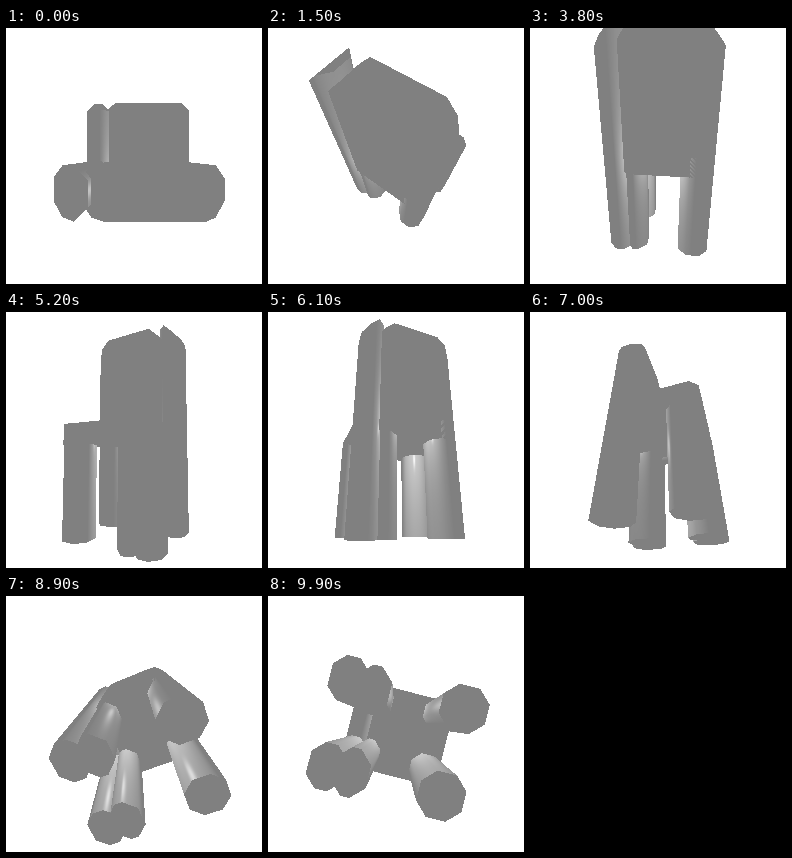
These frames come from a looping animation (256x256 px, 10000 ms). An HTML page with a canvas:

```html
<!DOCTYPE html>
<html>
<head>
<meta charset="utf-8">
<style>
html, body { margin: 0; width: 100%; height: 100%; overflow: hidden; background: #fff; }
canvas { display: block; width: 256px; height: 256px; }
</style>
</head>
<body>
<canvas id="stage" width="256" height="256"></canvas>
<script>
const SIZE = 256, FOCAL = 232, DIST = 415, FRAMES = 100, STEP = 100;
const LIGHT = [0, 54, 12];          // x: right, y: towards the chair back, z: up
const FLOOR = -162, TOP = 205, SHOULDER = 175, SEAT = 23, UNDER = -10;
const ctx = document.getElementById('stage').getContext('2d');
const image = ctx.createImageData(SIZE, SIZE);
const pixels = new Uint32Array(image.data.buffer);
const depth = new Float32Array(SIZE * SIZE);
const triangles = [];

const dot = (a, b) => a[0] * b[0] + a[1] * b[1] + a[2] * b[2];
const sub = (a, b) => [a[0] - b[0], a[1] - b[1], a[2] - b[2]];
const unit = a => { const l = Math.hypot(...a) || 1; return a.map(v => v / l); };
const quad = (a, b, c, d) => triangles.push([a, b, c], [a, c, d]);

// Prism with chamfered corners, smooth sides and separate ends.
// Its top height may vary with x, bending at the given x positions.
function prism(x0, x1, y0, y1, z0, z1, c, { bends = [], turn = p => p } = {}) {
  const top = typeof z1 === 'function' ? z1 : () => z1;
  const cols = [x0, x0 + c, ...bends, x1 - c, x1], last = cols.length - 1;
  const S = Math.sin(Math.PI / 8), C = Math.cos(Math.PI / 8);
  const outer = i => i === 0 || i === last;
  const slope = i => outer(i) ? C : i === 1 || i === last - 1 ? S : 0;
  const point = (i, back) => {
    const inset = outer(i) ? c : 0;
    const nx = slope(i) * (i < 2 ? -1 : 1), ny = Math.sqrt(1 - nx * nx) * (back ? 1 : -1);
    return { x: cols[i], y: back ? y1 - inset : y0 + inset, n: turn([nx, ny, 0]) };
  };
  const at = (p, z, n = p.n) => ({ p: turn([p.x, p.y, z]), n });
  const front = cols.map((_, i) => point(i, false));
  const back = cols.map((_, i) => point(i, true));
  const ring = [...front, ...[...back].reverse()];
  ring.forEach((p, k) => {
    const q = ring[(k + 1) % ring.length];
    quad(at(p, z0), at(q, z0), at(q, top(q.x)), at(p, top(p.x)));
  });
  for (let i = 0; i < last; i++) {
    const strip = [front[i], front[i + 1], back[i + 1], back[i]];
    quad(...strip.map(p => at(p, z0, turn([0, 0, -1]))));
    quad(...strip.map(p => at(p, top(p.x), turn([0, 0, 1]))));
  }
}

// Posts and legs
prism(-83, -42, 9, 60, FLOOR, x => Math.min(TOP, SHOULDER + x + 83), 13);
prism(42, 94, 9, 60, FLOOR, SEAT, 14.5);
prism(-82, -42, -90, -38, FLOOR, 10, 13);
prism(42, 93, -90, -38, FLOOR, SEAT, 14.5);
prism(-54, -15, 4, 57, FLOOR, 0, 14.5);
prism(-54, -15, -91, -36, FLOOR, 0, 14.5);
// Back with sloping shoulders, seat and side rail
const rise = TOP - SHOULDER;
prism(-56, 94, 9, 60, UNDER, x => Math.min(TOP, SHOULDER + x + 56, SHOULDER + 94 - x), 14.5,
  { bends: [-56 + rise, 94 - rise] });
prism(-43, 92.5, -90, 40, UNDER, SEAT, 12);
prism(-81, -42, UNDER, SEAT, -78, 35, 12, { turn: p => [p[0], p[2], p[1]] });

function shade(p, n, eye) {
  n = unit(n);
  const l = unit(sub(LIGHT, p)), d = dot(n, l);
  if (d <= 0) return 128;
  const r = n.map((v, k) => 2 * d * v - l[k]);
  const s = Math.max(0, dot(r, unit(sub(eye, p))));
  return Math.min(255, 128 + 76 * d + 51 * s ** 64);
}

function fill(t, project, eye) {
  const [a, b, c] = t.map(v => project(v.p));
  const area = (b.x - a.x) * (c.y - a.y) - (b.y - a.y) * (c.x - a.x);
  if (Math.abs(area) < 1e-6) return;
  const low = k => Math.max(0, Math.floor(Math.min(a[k], b[k], c[k])));
  const high = k => Math.min(SIZE - 1, Math.ceil(Math.max(a[k], b[k], c[k])));
  const xa = low('x'), xb = high('x'), ya = low('y'), yb = high('y');
  for (let y = ya; y <= yb; y++) {
    for (let x = xa; x <= xb; x++) {
      const px = x + .5, py = y + .5;
      const u = ((b.x - px) * (c.y - py) - (b.y - py) * (c.x - px)) / area;
      const v = ((c.x - px) * (a.y - py) - (c.y - py) * (a.x - px)) / area;
      const w = 1 - u - v;
      if (u < 0 || v < 0 || w < 0) continue;
      const q = u * a.q + v * b.q + w * c.q, at = y * SIZE + x;
      if (q <= depth[at]) continue;
      depth[at] = q;
      const mix = key => [0, 1, 2].map(k =>
        (u * a.q * t[0][key][k] + v * b.q * t[1][key][k] + w * c.q * t[2][key][k]) / q);
      const g = Math.round(shade(mix('p'), mix('n'), eye));
      pixels[at] = (0xff000000 | g << 16 | g << 8 | g) >>> 0;
    }
  }
}

function draw(i) {
  const el = (90 - 180 * i / (FRAMES - 1)) * Math.PI / 180;
  // the view flips over exactly at both poles
  const az = (14.4 * i + (i % (FRAMES - 1) ? 180 : 0)) * Math.PI / 180;
  const ca = Math.cos(az), sa = Math.sin(az), ce = Math.cos(el), se = Math.sin(el);
  const right = [ca, -sa, 0], up = [-sa * se, -ca * se, ce], back = [sa * ce, ca * ce, se];
  const eye = back.map(v => v * DIST);
  const project = p => {
    const q = 1 / (DIST - dot(p, back));
    return { x: SIZE / 2 + FOCAL * dot(p, right) * q, y: SIZE / 2 - FOCAL * dot(p, up) * q, q };
  };
  pixels.fill(0xffffffff);
  depth.fill(0);
  for (const t of triangles) fill(t, project, eye);
  ctx.putImageData(image, 0, 0);
}

let shown = -1;
const start = performance.now();
function tick() {
  const i = Math.floor((performance.now() - start) / STEP) % FRAMES;
  if (i !== shown) draw(shown = i);
  requestAnimationFrame(tick);
}
tick();
</script>
</body>
</html>
```
